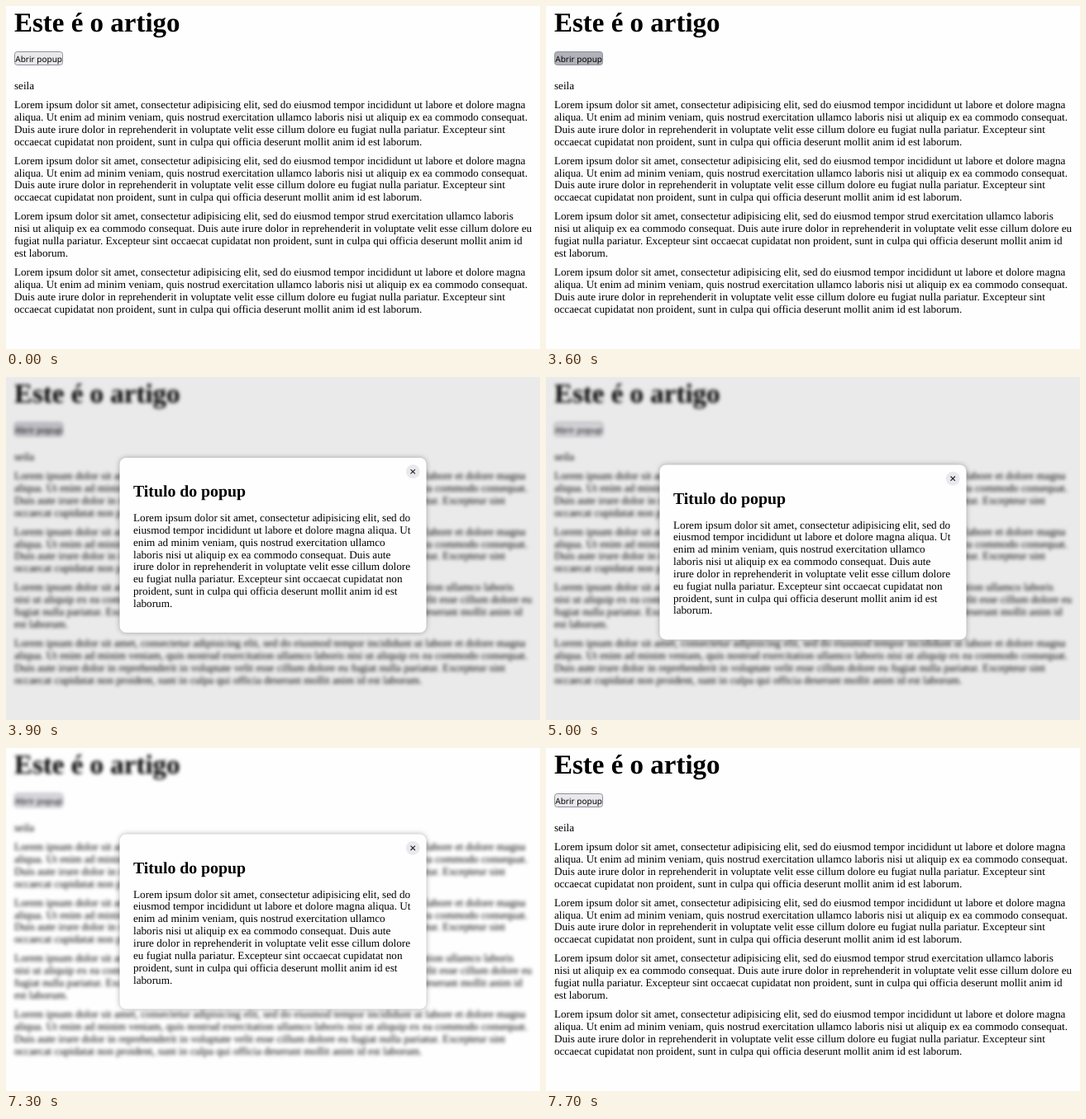
These frames come from a looping animation (646x416 px, 8 s). An HTML page:

```html
<!DOCTYPE html>
<html lang="pt">
<head>
<meta charset="utf-8">
<title>Este é o artigo</title>
<style>
html, body { margin: 0; width: 100%; height: 100%; overflow: hidden; background: #fefefe; }
svg { display: block; width: 646px; height: 416px; }
text { font: 13.2px "Liberation Serif", "Times New Roman", serif; text-rendering: geometricPrecision; }
.h1 { font-size: 33px; font-weight: bold; }
.h2 { font-size: 19.8px; font-weight: bold; }
.ui { font: 10px "Noto Sans", "Open Sans", sans-serif; }
#button { fill: #e9e9ed; stroke: #8f8f9d; }
#card { filter: drop-shadow(0 0 3px rgba(0, 0, 0, .32)); }
</style>
</head>
<body>
<svg viewBox="0 0 646 416">
  <rect width="646" height="416" fill="#fefefe"/>
  <g id="page">
    <text class="h1" x="9.9" y="31">Este é o artigo</text>
    <rect id="button" x="10.5" y="55.5" width="58" height="16" rx="3"/>
    <text class="ui" x="11.3" y="67.5">Abrir popup</text>
    <text x="9.9" y="101">seila</text>
  </g>
  <rect id="shade" width="646" height="416" fill="#000" fill-opacity=".08"/>
  <g id="popup">
    <rect id="card" x="137.5" y="106.5" width="371" height="212" rx="8" fill="#fefefe"/>
    <circle cx="492.2" cy="123.2" r="8.4" fill="#e9e9ed"/>
    <path d="M489.5 120.5l5.4 5.4m0-5.4l-5.4 5.4" stroke="#222" stroke-width="1.1"/>
    <text class="h2" x="154" y="153.6">Titulo do popup</text>
  </g>
</svg>
<script>
const LOOP = 8000, FRAME = 100, LINE = 14.85;
const $ = id => document.getElementById(id);

const tail = [
  "Duis aute irure dolor in reprehenderit in voluptate velit esse cillum dolore eu fugiat nulla pariatur. Excepteur sint",
  "occaecat cupidatat non proident, sunt in culpa qui officia deserunt mollit anim id est laborum."
];
const full = [
  "Lorem ipsum dolor sit amet, consectetur adipisicing elit, sed do eiusmod tempor incididunt ut labore et dolore magna",
  "aliqua. Ut enim ad minim veniam, quis nostrud exercitation ullamco laboris nisi ut aliquip ex ea commodo consequat.",
  ...tail
];
const short = [
  "Lorem ipsum dolor sit amet, consectetur adipisicing elit, sed do eiusmod tempor strud exercitation ullamco laboris",
  "nisi ut aliquip ex ea commodo consequat. Duis aute irure dolor in reprehenderit in voluptate velit esse cillum dolore eu",
  "fugiat nulla pariatur. Excepteur sint occaecat cupidatat non proident, sunt in culpa qui officia deserunt mollit anim id",
  "est laborum."
];
const popupText = [
  "Lorem ipsum dolor sit amet, consectetur adipisicing elit, sed do",
  "eiusmod tempor incididunt ut labore et dolore magna aliqua. Ut",
  "enim ad minim veniam, quis nostrud exercitation ullamco",
  "laboris nisi ut aliquip ex ea commodo consequat. Duis aute",
  "irure dolor in reprehenderit in voluptate velit esse cillum dolore",
  "eu fugiat nulla pariatur. Excepteur sint occaecat cupidatat non",
  "proident, sunt in culpa qui officia deserunt mollit anim id est",
  "laborum."
];

function paragraph(parent, lines, x, y) {
  lines.forEach((line, i) => {
    const el = document.createElementNS("http://www.w3.org/2000/svg", "text");
    el.setAttribute("x", x);
    el.setAttribute("y", y + i * LINE);
    el.textContent = line;
    parent.append(el);
  });
}
[full, full, short, full].forEach((p, i) => paragraph($("page"), p, 9.9, 124 + i * 67.7));
paragraph($("popup"), popupText, 154, 183.5);

// Each step is [ms, value, easing towards the next step].
const anims = [];
function track(id, prop, steps) {
  const frames = steps.map(([ms, value, easing = "step-end"]) =>
    ({ offset: ms / LOOP, [prop]: value, easing }));
  frames.push({ offset: 1, [prop]: steps.at(-1)[1] });
  const anim = $(id).animate(frames, { duration: LOOP, fill: "both" });
  anim.pause();
  anims.push(anim);
}

track("button", "fill", [[0, "#e9e9ed"], [1700, "#d0d0d7"], [3600, "#b1b1b9"],
  [3700, "#d0d0d7"], [4500, "#e9e9ed"], [7300, "#d9d9df"], [7700, "#e9e9ed"]]);
track("page", "filter", [[0, "none"], [3700, "blur(2px)"], [7700, "none"]]);
track("shade", "visibility", [[0, "hidden"], [3700, "visible"], [7300, "hidden"]]);
track("popup", "visibility", [[0, "hidden"], [3700, "visible"], [7700, "hidden"]]);
track("popup", "transform", [[0, "translateY(-20px)"], [3700, "translateY(-20px)", "ease"],
  [4300, "translateY(0px)"], [7260, "translateY(0px)", "ease"], [7660, "translateY(-20px)"]]);

const start = performance.now();
function draw() {
  const t = (performance.now() - start) % LOOP;
  const time = Math.floor(t / FRAME) * FRAME + 0.01;
  for (const anim of anims) anim.currentTime = time;
  requestAnimationFrame(draw);
}
draw();
</script>
</body>
</html>
```
